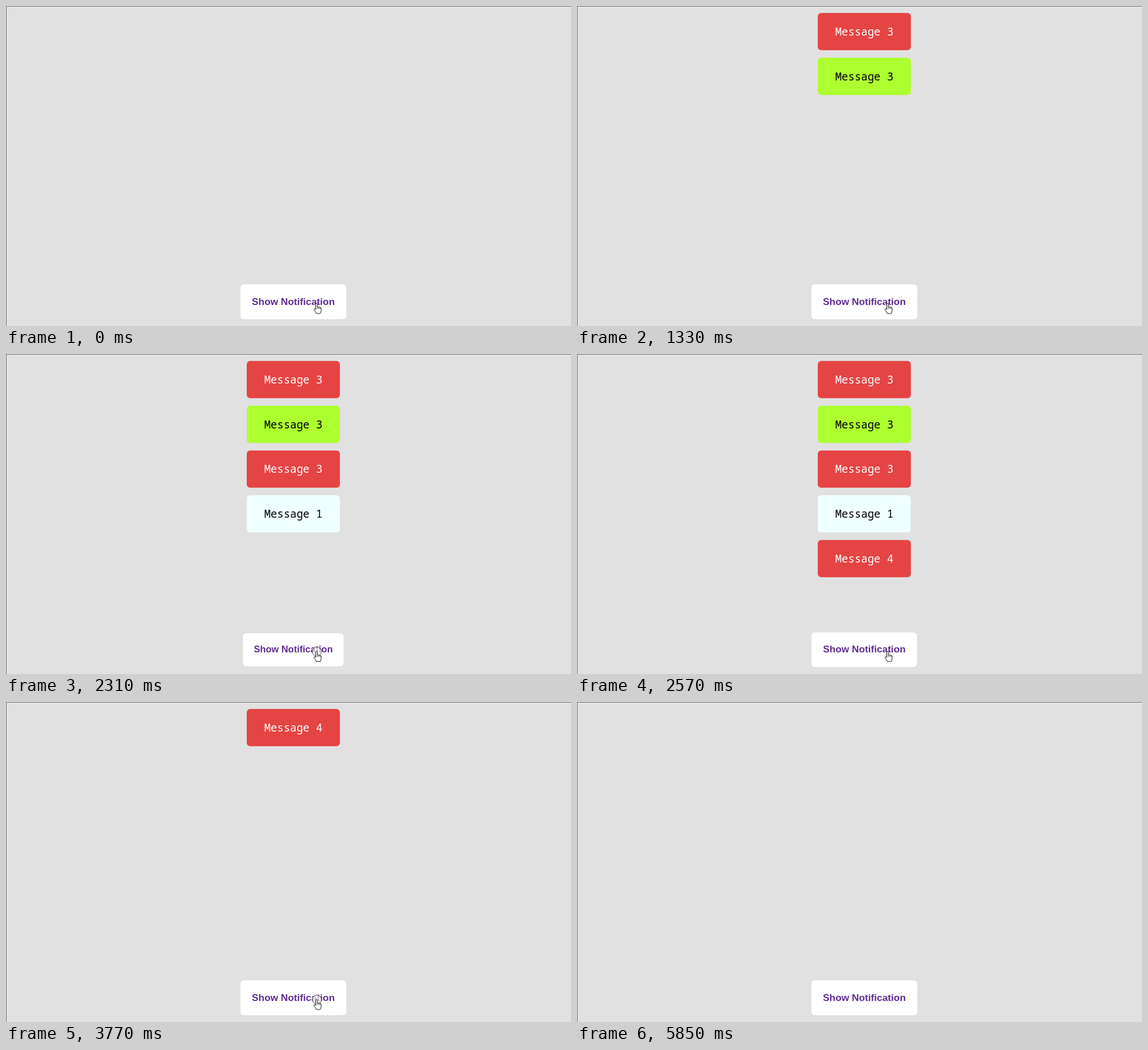
Write an HTML page that moves like this. It is 995 px wide and 563 px high and loops after 6.44 s.

```html
<!DOCTYPE html>
<html lang="en">
<head>
<meta charset="utf-8">
<title>Notifications</title>
<style>
  html, body { margin: 0; width: 100%; height: 100%; overflow: hidden; background: #e1e1e1; }
  svg { display: block; width: 995px; height: 563px; }
  text { text-anchor: middle; }
  .toast text { font: 19px "Noto Sans Mono", monospace; }
  .red { fill: #e54444; }
  .green { fill: #adff2f; }
  .azure { fill: #f0ffff; }
  .red + text { fill: #fff; font-weight: 500; }
  #button text { font: bold 17.3px "Liberation Sans", Arial, sans-serif; fill: #5f2d95; }
  #cursor path { fill: #fff; stroke: #111; stroke-linejoin: round; }
</style>
</head>
<body>
<svg viewBox="0 0 995 563">
  <rect width="995" height="563" fill="#e1e1e1"/>
  <path d="M0 .5H995M.5 0V563" stroke="#707070"/>
  <g id="toasts"></g>
  <g id="button">
    <rect x="-93.2" y="-30.6" width="186.4" height="61.2" rx="6" fill="#fff"/>
    <text y="5.2">Show Notification</text>
  </g>
  <g id="cursor">
    <circle id="ring" cx=".5" cy=".5" r="8" fill="#fff" fill-opacity=".65" stroke="#333" stroke-width=".9"/>
    <g id="hand">
      <path d="M-1.5 11V1.5a1.4 1.4 0 0 1 2.8 0V6.6q1.3-.9 2.5.3 1.4-.8 2.4.5 1.7-.4 1.8 1.3V12.5Q7.8 15 6.5 18H-.5Q-1.6 15-4.5 11.4q-.6-2 1.2-2Z"/>
      <path d="M1.3 6.6V10M3.8 6.9V10M6.2 7.4V10" stroke-width=".8"/>
    </g>
    <path id="arrow" d="M0 0V16L3.7 12.6 6 18 8.5 17 6.2 11.7H11.3Z"/>
  </g>
</svg>
<script>
const LOOP = 6440, LIFETIME = 2000;
const CURSOR_HOME = [547, 523], CURSOR_EXIT = [832, 566];

// ring: tap feedback appears, down: shrinking starts, up: release adds the toast
const clicks = [
  { ring: 500, down: 510, up: 590, color: 'red', label: 'Message 3' },
  { ring: 1000, down: 1010, up: 1100, color: 'green', label: 'Message 3' },
  { ring: 1520, down: 1500, up: 1560, color: 'red', label: 'Message 3' },
  { ring: 1690, down: 1690, up: 1770, color: 'azure', label: 'Message 1' },
  { ring: 2310, down: 2210, up: 2380, color: 'red', label: 'Message 4' },
  { ring: 3770, down: 3785, up: 3850, color: 'green', label: 'Message 1' }
];

const $ = id => document.getElementById(id);
const clamp = x => Math.min(1, Math.max(0, x));
const easeOut = x => 1 - (1 - clamp(x)) ** 2;
const smooth = x => { x = clamp(x); return x * x * (3 - 2 * x); };
const show = (node, on) => node.setAttribute('visibility', on ? 'visible' : 'hidden');
const place = (node, x, y, scale = 1) =>
  node.setAttribute('transform', `translate(${x} ${y}) scale(${scale})`);

$('toasts').innerHTML = clicks.map(c => `<g class="toast">
  <rect class="${c.color}" x="424" width="164" height="65.6" rx="6"/>
  <text x="506" y="39.8">${c.label}</text></g>`).join('');
const toasts = [...$('toasts').children];

function pressDepth(t) {
  const click = clicks.findLast(c => t >= c.ring);
  if (!click) return 0;
  const depth = time => easeOut((time - click.down) / 80);
  return t < click.up ? depth(t) : depth(click.up) * (1 - smooth((t - click.up) / 230));
}

function render(t) {
  let row = 0;
  clicks.forEach((c, i) => {
    const alive = t >= c.up && t < c.up + LIFETIME;
    show(toasts[i], alive);
    if (alive) place(toasts[i], 0, 12.2 + 78.75 * row++);
  });

  place($('button'), 506, 520.3, 1 - 0.049 * pressDepth(t));

  const leave = smooth((t - 4030) / 330);
  const [x, y] = CURSOR_HOME.map((from, i) => from + (CURSOR_EXIT[i] - from) * leave);
  const visible = t < 4360, overButton = x < 599 && y < 551;
  place($('cursor'), x, y);
  show($('hand'), visible && overButton);
  show($('arrow'), visible && !overButton);
  show($('ring'), clicks.some(c => t >= c.ring && t < c.up));
}

const start = performance.now();
function tick() {
  render((performance.now() - start) % LOOP);
  requestAnimationFrame(tick);
}
tick();
</script>
</body>
</html>
```
